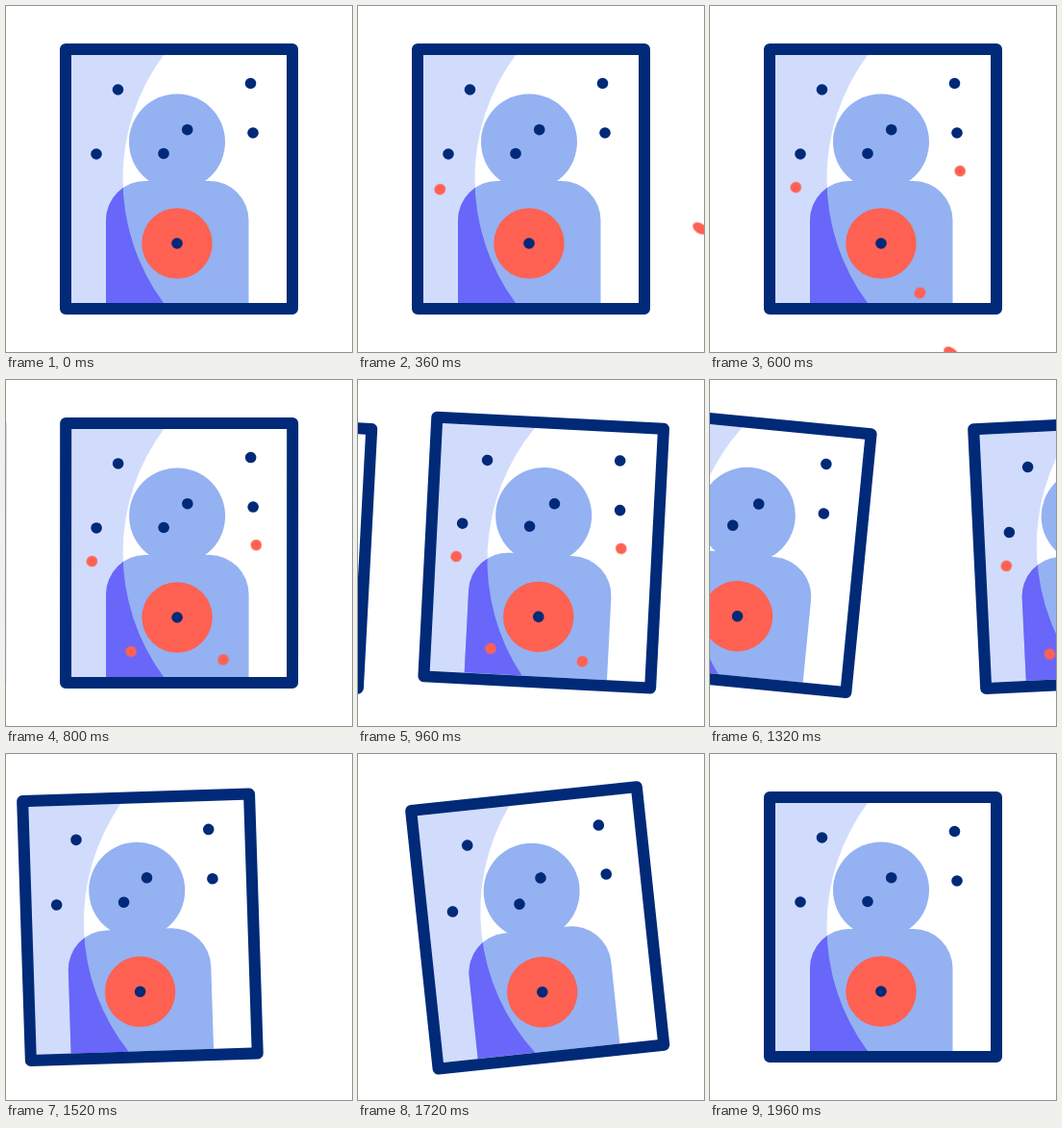
Recreate the animation shown at these times as an HTML page. Size 360x360 px, loop 2 s.

```html
<!DOCTYPE html>
<html lang="en">
<head>
<meta charset="utf-8">
<title>Target practice</title>
<style>
  html, body { margin: 0; width: 100%; height: 100%; overflow: hidden; background: #fff; }
  svg { display: block; width: 100vw; height: 100vh; }

  .panel { transform-origin: 188px 180px; }
  .leaving { animation: leave 2s infinite, leave-tilt 2s infinite; }
  .arriving { animation: arrive 2s infinite, arrive-tilt 2s infinite; }

  /* Slides: each stretch joins the next at the same speed. */
  @keyframes leave {
    0% { translate: 0; }
    38% { translate: 0; animation-timing-function: cubic-bezier(.333, 0, .667, 0); }
    48% { translate: 13px; animation-timing-function: cubic-bezier(.333, .187, .667, .523); }
    56% { translate: 70px; animation-timing-function: cubic-bezier(.333, .23, .667, .567); }
    66% { translate: 217.5px; animation-timing-function: linear; }
    72%, 100% { translate: 341px; }
  }
  @keyframes arrive {
    0% { translate: -304px; }
    38% { translate: -304px; animation-timing-function: cubic-bezier(.333, 0, .667, 0); }
    48% { translate: -291px; animation-timing-function: cubic-bezier(.333, .2, .667, .543); }
    56% { translate: -240.7px; animation-timing-function: cubic-bezier(.333, .295, .667, .637); }
    66% { translate: -143.5px; animation-timing-function: cubic-bezier(.333, .345, .667, .7); }
    76% { translate: -41px; animation-timing-function: cubic-bezier(.333, .69, .667, 1); }
    87% { translate: 7px; animation-timing-function: cubic-bezier(.37, 0, .63, 1); }
    97.5%, 100% { translate: 0; }
  }

  /* Tilts: lean into the move, then swing back. */
  @keyframes leave-tilt {
    0% { rotate: 0deg; }
    38% { rotate: 0deg; animation-timing-function: cubic-bezier(.333, 0, .667, 0); }
    48% { rotate: 2.9deg; animation-timing-function: cubic-bezier(.333, .35, .667, 1); }
    55.25% { rotate: 8.9deg; animation-timing-function: cubic-bezier(.37, 0, .63, 1); }
    71% { rotate: -6.1deg; }
    100% { rotate: -6.1deg; }
  }
  @keyframes arrive-tilt {
    0% { rotate: 0deg; }
    38% { rotate: 0deg; animation-timing-function: cubic-bezier(.333, 0, .667, 0); }
    48% { rotate: 3deg; animation-timing-function: cubic-bezier(.333, .35, .667, 1); }
    55.5% { rotate: 9.4deg; animation-timing-function: cubic-bezier(.37, 0, .63, 1); }
    87.25% { rotate: -6.1deg; animation-timing-function: cubic-bezier(.37, 0, .63, 1); }
    95.5% { rotate: 0deg; }
    100% { rotate: 0deg; }
  }

  /* Shots: fly in along --angle from --dist away, stretched while fast. */
  .shot {
    --start: translateX(var(--dist)) scale(1.5, .9);
    fill: #ff6152;
    animation: 2s cubic-bezier(.333, .667, .667, 1) infinite;
  }
  .s1 { --dist: -112px; animation-name: shot1; }
  .s2 { --dist: -129px; animation-name: shot2; }
  .s3 { --dist: -122px; animation-name: shot3; }
  .s4 { --dist: -173px; animation-name: shot4; }
  @keyframes shot1 {
    0%, 11.25% { transform: var(--start); }
    19.75%, 100% { transform: translateX(0) scale(1, 1); }
  }
  @keyframes shot2 {
    0%, 17.5% { transform: var(--start); }
    26% { transform: translateX(0) scale(1, 1); }
    100% { transform: translateX(0) scale(1, 1); }
  }
  @keyframes shot3 {
    0%, 24% { transform: var(--start); }
    32.6%, 100% { transform: translateX(0) scale(1, 1); }
  }
  @keyframes shot4 {
    0%, 29.3% { transform: var(--start); }
    37.8%, 100% { transform: translateX(0) scale(1, 1); }
  }
</style>
</head>
<body>
<svg viewBox="0 0 360 360">
  <defs>
    <path id="shade" d="M62 51H164A217 217 0 0 0 164 309H62Z"/>
    <path id="torso" d="M104 309V223A41 41 0 0 1 145 182H211.5A41 41 0 0 1 252.5 223V309Z"/>
    <clipPath id="in-shade"><use href="#shade"/></clipPath>
    <g id="target">
      <rect x="62" y="45" width="236" height="270" fill="#fff"/>
      <use href="#shade" fill="#d1dcfd"/>
      <g fill="#94b1f2">
        <circle cx="178" cy="141.5" r="50"/>
        <use href="#torso"/>
      </g>
      <g clip-path="url(#in-shade)"><use href="#torso" fill="#6966fa"/></g>
      <circle cx="178" cy="247" r="36.7" fill="#ff6152"/>
      <rect x="62" y="45" width="236" height="270" fill="none" stroke="#002a78" stroke-width="12" stroke-linejoin="round"/>
      <g fill="#002a78">
        <circle cx="116.5" cy="87" r="5.8"/>
        <circle cx="254.5" cy="80.5" r="5.8"/>
        <circle cx="94" cy="154" r="5.8"/>
        <circle cx="257" cy="132" r="5.8"/>
        <circle cx="188.7" cy="128.7" r="5.8"/>
        <circle cx="164" cy="153.5" r="5.8"/>
        <circle cx="178" cy="247" r="5.8"/>
      </g>
    </g>
  </defs>

  <g class="panel arriving"><use href="#target"/></g>
  <g class="panel leaving">
    <use href="#target"/>
    <g transform="translate(89.3 188.7) rotate(-27)"><circle class="shot s1" r="5.8"/></g>
    <g transform="translate(260.2 171.7) rotate(212)"><circle class="shot s2" r="5.8"/></g>
    <g transform="translate(226 291) rotate(-45)"><circle class="shot s3" r="5.8"/></g>
    <g transform="translate(130 282.5) rotate(213)"><circle class="shot s4" r="5.8"/></g>
  </g>
</svg>
</body>
</html>
```
